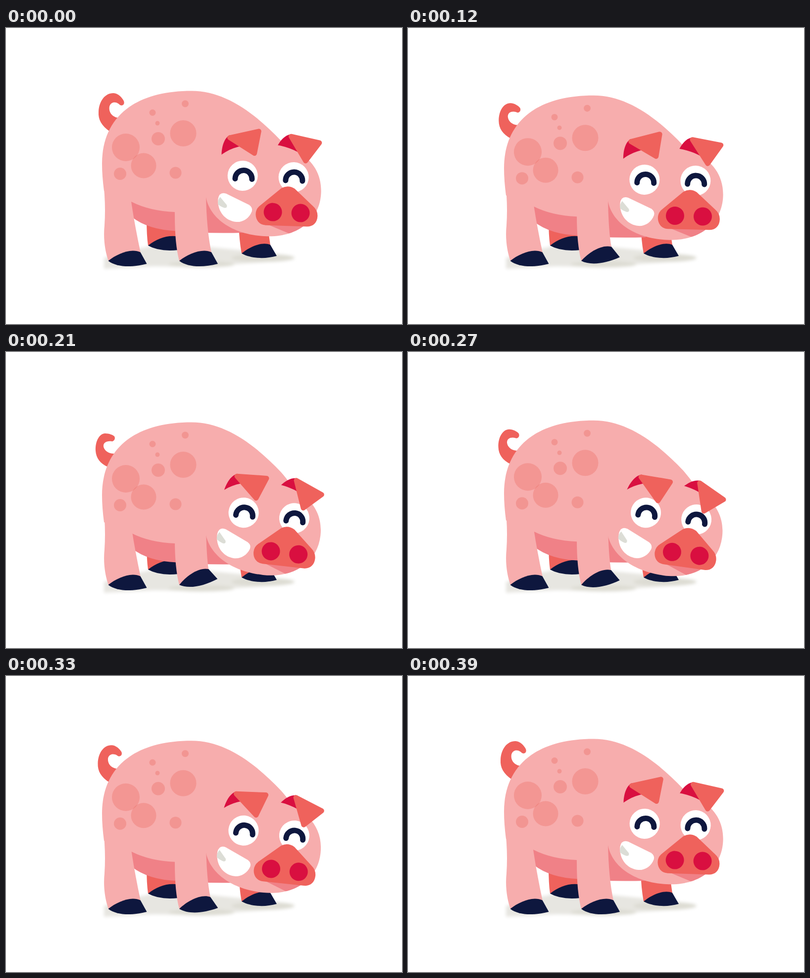
Recreate the animation shown at these times as an HTML page. Size 800 by 600 pixels, loop 420 ms.

```html
<!DOCTYPE html>
<html lang="en">
<head>
<meta charset="utf-8">
<title>Bouncing pig</title>
<style>
html, body { margin: 0; width: 100%; height: 100%; overflow: hidden; background: #fff; }
svg { display: block; width: 100%; height: 100%; }
.pink { fill: #f7adad; }
.shade { fill: #f08187; }
.coral { fill: #ef625c; }
.red { fill: #d90f40; }
.navy { fill: #0e173e; }
.flap { fill: #ef625c; stroke: #ef625c; stroke-width: 10; stroke-linejoin: round; }
.smile { fill: none; stroke: #0e173e; stroke-width: 11; stroke-linecap: round; }
</style>
</head>
<body>
<svg viewBox="0 0 800 600">
  <defs>
    <filter id="soft" x="-10%" y="-40%" width="120%" height="180%"><feGaussianBlur stdDeviation="3"/></filter>
    <path id="skull" d="M402.500 326C402.500 264 446 232 520 231.500C588 231 636.500 267 636.500 326C636.500 383 590 418.500 530 418.500C455 418.500 402.500 380 402.500 326Z"/>
    <clipPath id="inHead"><use href="#skull"/></clipPath>
    <path id="hoof" d="M350 472C369 457 397 446 415 454.500L428 478C397 486 367 485 350 472Z"/>
  </defs>

  <g filter="url(#soft)">
    <path fill="#e7e6e1" d="M198 466L245 452L300 441L400 443L490 452L580 463L560 472L460 479L420 485L300 483L198 488Z"/>
    <ellipse cx="519" cy="466" rx="64" ry="8" fill="#dddcd3"/>
    <ellipse cx="395" cy="479" rx="66" ry="6.500" fill="#dddcd3"/>
  </g>

  <g class="body"><path id="tail" class="coral"/></g>

  <path class="coral" d="M284 385Q284 420 287 441L344 436V385ZM470 395Q471 430 476 457L534 440Q531 420 528 395Z"/>
  <path class="navy" d="M287 441C305 427 325 419 348 422.500V450Q310 454 287 441ZM476 457C494 442 518 433 534 439.500L547 462C522 469 494 467 476 457Z"/>

  <g class="body">
    <path class="shade" d="M240 340V370Q275 409 345 411.500Q400 417 480 415V335Z"/>
    <path class="pink" d="M194 275C194 185 255 127.500 375 127.500C440 127.500 500 169.500 556 229C575 251 590 272 595 300L500 330L404 338L341 373Q290 371 253 352L198 330Q194 300 194 275Z"/>
  </g>

  <path class="pink" d="M196 305C200 340 201 370 199 400C196 430 201 455 207 472L272 456Q259 395 252 345Z"/>
  <use href="#hoof" class="navy" x="-143.500"/>
  <path id="leg" class="pink"/>
  <use id="step" href="#hoof" class="navy"/>

  <g id="spots" class="body" fill="#e76056" fill-opacity=".3"></g>

  <g id="head">
    <path class="red ear" data-pivot="432 256" d="M433 257C431 240 434 222 444 215L490 245L480 280H435Z"/>
    <path class="red ear" data-pivot="545 234" d="M545 235C550 222 557 212 568 208L600 245L575 262L548 245Z"/>
    <use href="#skull" class="pink"/>
    <path class="shade" clip-path="url(#inHead)" d="M524 392L585 415H640V392Z"/>
    <path fill="#fff" d="M445 335L492 356Q500 361 498 369C493 384 480 392 467 391.500C445 390 428 372 429 346Q431 331 445 335Z"/>
    <path fill="#dcddd6" d="M433 342L447 358Q449 364 443 364Q435 362 429 357Q428 348 433 342Z"/>
    <circle cx="477" cy="297.500" r="30.500" fill="#fff"/>
    <circle cx="580" cy="297" r="30.500" fill="#fff"/>
    <path class="smile" d="M462 304V303.500A17 17 0 0 1 496 303.500V304M564 304V303.500A17 17 0 0 1 598 303.500V304"/>
    <path class="coral" d="M556 320Q569 312 583 320L621 354Q631 362 631 374C631 388 622 396 610 396H527C514 396 506 386 506 374Q506 363 515 356Z"/>
    <circle class="red" cx="540.500" cy="369" r="18.500"/>
    <circle class="red" cx="596.500" cy="369" r="18.500"/>
    <path class="flap ear" data-pivot="432 256" d="M445 220L501.500 199.500L498.500 245Z"/>
    <path class="flap ear" data-pivot="545 234" d="M570 212L628.500 217.500L605.500 257.500Z"/>
  </g>
</svg>
<script>
const $ = id => document.getElementById(id);
const all = sel => [...document.querySelectorAll(sel)];
const place = (el, value) => el.setAttribute('transform', value);
const LOOP = 420, STEP = 30, CYCLE = 390, DOWN = 210, LAG = 60;

$('spots').innerHTML = [
  [242, 242, 28], [278, 279, 25.5], [230.5, 295.5, 12.5], [307.5, 224.5, 13.5], [358, 213.5, 26.5],
  [362, 153.5, 7], [296, 171.5, 6.5], [306, 193, 4.5], [342.5, 293.5, 12]
].map(([x, y, r]) => `<circle cx="${x}" cy="${y}" r="${r}"/>`).join('');

// Tail outline with the body up and with the body down.
const tailUp = 'M210 210C193 198 186 186 187 170C188 148 200 132 217 132C227 132 235 142 238 148C241 156 233 160 228 154C222 149 212 149 209 159C207 170 214 180 226 182L226 205Z';
const tailDown = 'M206 218C190 211 182 200 181 185C180 164 190 150 200 150C208 150 216 153 219 156C222 162 217 167 213 166C204 165 196 168 197 177C199 185 207 191 218 191L226 205Z';
const downNums = tailDown.match(/\d+/g).map(Number);

function tailPath(k) {
  let i = 0;
  return tailUp.replace(/\d+/g, n => (+n + (downNums[i++] - n) * k).toFixed(2));
}

const bodies = all('.body'), ears = all('.ear');
const ease = p => (1 - Math.cos(Math.PI * p)) / 2;

// 0 = raised, 1 = lowered
function bounce(t) {
  t = (t + CYCLE) % CYCLE;
  return t < DOWN ? ease(t / DOWN) : 1 - ease((t - DOWN) / (CYCLE - DOWN));
}

function pose(t) {
  const b = bounce(t), h = bounce(t - LAG), drop = 15 * b;
  bodies.forEach(el => place(el, `translate(0 ${drop})`));
  $('tail').setAttribute('d', tailPath(b));

  const lift = -13.3 * Math.pow(b, 0.6), a = lift * Math.PI / 180;
  const x = 350 + 65 * Math.cos(a) + 17.5 * Math.sin(a);
  const y = 472 + 65 * Math.sin(a) - 17.5 * Math.cos(a);
  place($('step'), `rotate(${lift} 350 472)`);
  $('leg').setAttribute('d',
    `M340 ${330 + drop}L341 380Q341 438 350 472L${x} ${y + 0.5}Q405 ${408 + drop / 2} 404 ${338 + drop}Z`);

  place($('head'), `translate(0 ${drop - 3}) rotate(${8 * h} 336 332.5)`);
  ears.forEach(el => place(el, `rotate(${21.5 * h} ${el.dataset.pivot})`));
}

function frame() {
  const t = performance.now() % LOOP;
  pose(Math.floor(t / STEP) * STEP);
  requestAnimationFrame(frame);
}
frame();
</script>
</body>
</html>
```
